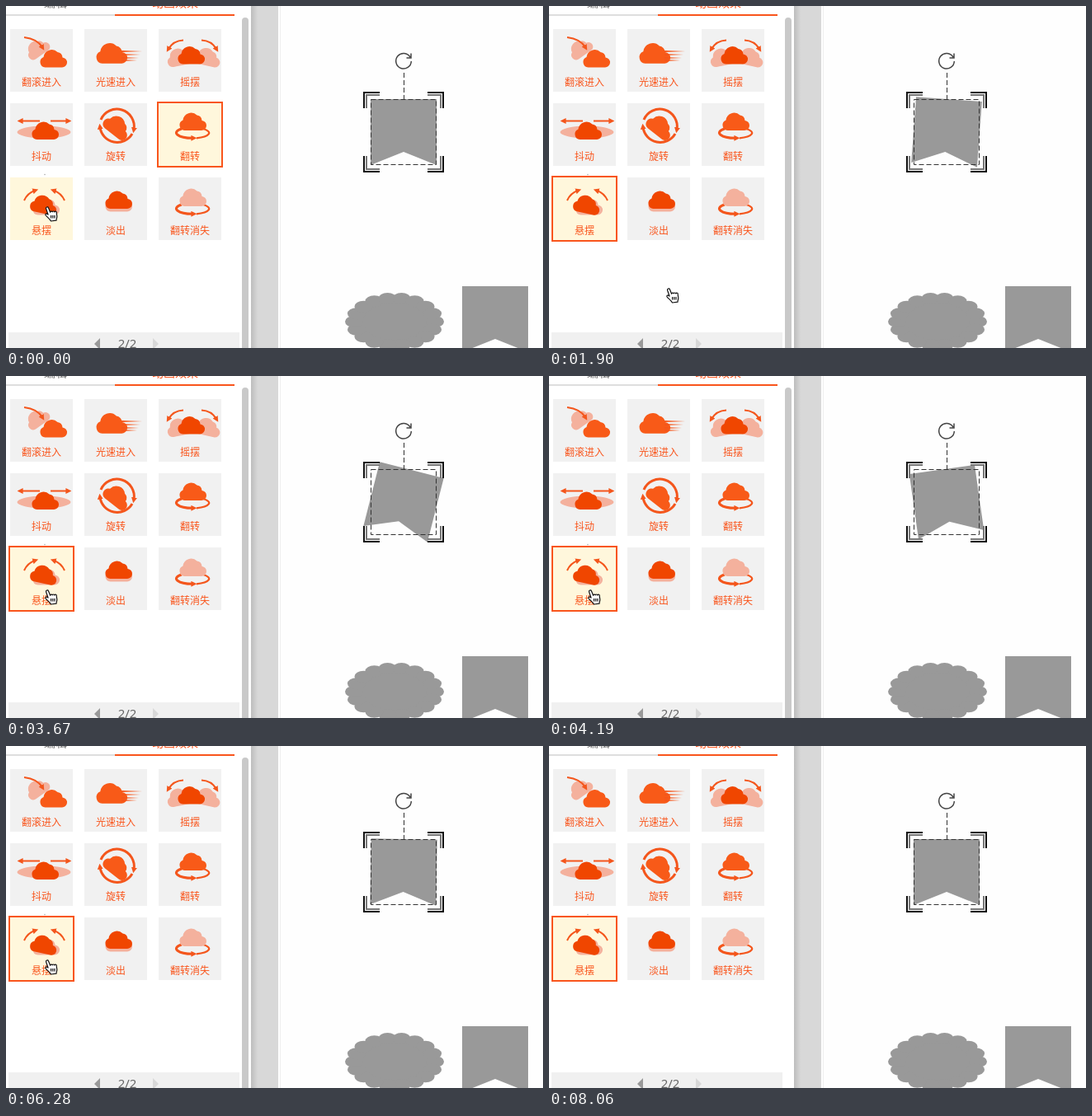
An HTML page that plays this animation: 651x415 px, repeating every 8.77 s.

```html
<!DOCTYPE html>
<html lang="zh-CN">
<head>
<meta charset="utf-8">
<style>
html, body { margin: 0; width: 100%; height: 100%; overflow: hidden; background: #fff; }
svg { display: block; }
text { font: 12px "Noto Sans CJK SC", "Noto Sans CJK", "Noto Sans", sans-serif; fill: #f9551c; text-anchor: middle; }
text.big { font-size: 14px; }
.gray { fill: #666; }
.dark { fill: #f04600; }
.mid { fill: #f85a18; }
.light { fill: #f4b19d; }
.arrow { fill: none; stroke: #f4561c; stroke-width: 2; marker-end: url(#head); }
.ring { fill: none; stroke: #f4561c; stroke-width: 2.2; }
.thick { stroke-width: 3; }
.shape { fill: #999; }
.dash { fill: none; stroke: #333; stroke-dasharray: 6 3; }
</style>
</head>
<body>
<svg width="651" height="415" viewBox="0 0 651 415">
  <defs>
    <path id="cloud" d="M7 23A6.5 6.5 0 0 1 5 10.5A10 10 0 0 1 22 4.5A7 7 0 0 1 28 11A6 6 0 0 1 27 23Z"/>
    <path id="banner" d="M-40-40H40V40L0 24L-40 40Z"/>
    <g id="bracket" fill="none" stroke-width="2">
      <path d="M1 20V1H20" stroke="#111"/>
      <path d="M4 20V4H20" stroke="#777"/>
    </g>
    <marker id="head" viewBox="0 0 8 8" refX="3" refY="4" markerWidth="7" markerHeight="7" markerUnits="userSpaceOnUse" orient="auto">
      <path d="M0 0L8 4L0 8Z" fill="#f4561c"/>
    </marker>
    <linearGradient id="shade">
      <stop offset="0" stop-color="#bdbdbd"/><stop offset=".25" stop-color="#d8d8d8"/>
    </linearGradient>
  </defs>

  <rect x="297" width="33" height="415" fill="url(#shade)"/>
  <rect x="330" width="321" height="415" fill="#fefefe"/>
  <rect x="332" width="1" height="415" fill="#eee"/>

  <text class="big gray" x="60" y="1">编辑</text>
  <text class="big" x="205" y="1">动画效果</text>
  <rect y="10" width="132" height="2" fill="#dedede"/>
  <rect x="132" y="10" width="145" height="2" fill="#f9551c"/>
  <rect id="bar" x="286" y="14" width="8" height="420" rx="4" fill="#c9c9c9"/>

  <g id="tiles"></g>
  <circle cx="47" cy="204.5" r=".8" fill="#aaa"/>

  <rect x="3" y="396" width="280" height="19" fill="#f0f0f0"/>
  <path d="M107 410L114 403V417Z" fill="#999"/>
  <path d="M185 410L178 403V417Z" fill="#d8d8d8"/>
  <text class="gray" x="147" y="415" style="font:15px 'Noto Sans',sans-serif">2/2</text>

  <g id="scallop" class="shape"><ellipse cx="471" cy="383" rx="54" ry="31"/></g>
  <use href="#banner" class="shape" x="593" y="380"/>
  <use href="#banner" class="shape" id="swing"/>

  <path class="dash" d="M482.5 81V113"/>
  <rect class="dash" x="442.5" y="113.5" width="79" height="79"/>
  <g id="corners"></g>
  <path d="M490 62A9.3 9.3 0 1 0 491.3 67M491 57.5V63H485.5" fill="none" stroke="#444" stroke-width="1.5"/>

  <path id="hand" fill="#fff" stroke="#111" stroke-width="1.2" stroke-linejoin="round"
    d="M4 10L1.6 3A1.5 1.5 0 0 1 4.5 2L6.6 7.3A1.4 1.4 0 0 1 9.2 6.8A1.4 1.4 0 0 1 11.8 7A1.3 1.3 0 0 1 14.2 8L14.8 12C14.9 14 14 15 14 17.2L7.5 18C6 15 2 12.5 1 10.7C.4 9.2 2.4 8.4 4 10ZM7.6 11V14.5M9.8 11V14.5M12 11V14.5"/>
</svg>
<script>
const $ = id => document.getElementById(id);
const cloud = (tone, x, y, scale = 1, turn = 0) =>
  `<use href="#cloud" class="${tone}" transform="translate(${x} ${y}) rotate(${turn}) scale(${scale}) translate(-16.5 -11.5)"/>`;
const arrow = (d, kind = '') => `<path class="arrow ${kind}" d="${d}"/>`;
const halo = y => `<path class="ring" d="M54 ${y - 5}A20 6.5 0 0 1 46 ${y + 6.3}"/>`
  + arrow(`M28 ${y - 5}A20 6.5 0 0 0 42 ${y + 6.3}`, 'thick');

// Icons use coordinates local to their 76 px tile.
const tiles = [
  ['翻滚进入', cloud('light', 32, 23, .9, -35) + cloud('mid', 52, 35) + arrow('M17 10Q33 12 39 22')],
  ['光速进入', cloud('mid', 32.5, 28.5, 1.15) + [27, 31, 35, 38].map((y, i) =>
    `<path d="M45 ${y - 1}L${70 - i * 2} ${y}L45 ${y + 1}Z" fill="#f4561c"/>`).join('')],
  ['摇摆', cloud('light', 25, 33, .98, -12) + cloud('light', 59, 33, .98, 12) + cloud('dark', 39, 31)
    + arrow('M30 13.5Q18 14 12 24') + arrow('M52 13.5Q64 14 70 24')],
  ['抖动', '<ellipse class="light" cx="41" cy="35" rx="32.5" ry="7.5"/>' + cloud('dark', 42, 32.5)
    + arrow('M36 21.5H13') + arrow('M49 21.5H70')],
  ['旋转', cloud('mid', 40, 27, 1.05, 38) + arrow('M20 20A21 21 0 0 1 60 32', 'thick') + arrow('M58 37A21 21 0 0 1 19 29', 'thick')],
  ['翻转', halo(36) + cloud('mid', 41, 21.5)],
  ['悬摆', cloud('light', 43, 34) + cloud('dark', 40.5, 32, 1, 12) + arrow('M17 28Q21 19 30 16') + arrow('M66 28Q62 19 53 16')],
  ['淡出', cloud('light', 41, 30) + cloud('dark', 41, 26.5)],
  ['翻转消失', halo(38) + cloud('light', 41, 23.5)],
];
$('tiles').innerHTML = tiles.map(([label, icon], i) =>
  `<g transform="translate(${5 + i % 3 * 90} ${28 + Math.floor(i / 3) * 90})">
  <rect class="tile" width="76" height="76"/>${icon}<text x="38" y="69">${label}</text></g>`).join('');
const rects = [...document.querySelectorAll('.tile')];

for (let i = 0; i < 18; i++) {
  const a = i / 18 * 2 * Math.PI;
  $('scallop').innerHTML += `<ellipse cx="${471 + 49 * Math.cos(a)}" cy="${383 + 28.5 * Math.sin(a)}" rx="11" ry="7"/>`;
}
$('corners').innerHTML = [[1, 1], [-1, 1], [1, -1], [-1, -1]].map(([x, y]) =>
  `<use href="#bracket" transform="translate(482 153) scale(${x} ${y}) translate(-49 -49)"/>`).join('');

const LOOP = 8770, SWING = 1870, CLICK = 560;
const starts = [745, 3398, 6250];
const angles = [0, 15, -10, 5, -5, 0];
// time, x, y of the pointer
const path = [[0, 47, 243], [720, 47, 243], [1000, 100, 300], [1350, 142, 342], [2100, 142, 342], [2350, 101, 327],
  [2590, 36, 286], [2770, 36, 286], [3000, 46, 259], [3120, 47, 259], [6450, 47, 259], [7050, 95, 420], [LOOP, 95, 420]];

// cubic-bezier(.25, .1, .25, 1)
function ease(x) {
  const curve = (s, a, b) => 3 * (1 - s) ** 2 * s * a + 3 * (1 - s) * s * s * b + s ** 3;
  let lo = 0, hi = 1;
  for (let i = 0; i < 20; i++) {
    const s = (lo + hi) / 2;
    if (curve(s, .25, .25) < x) lo = s; else hi = s;
  }
  return curve(lo, .1, 1);
}

function swingAngle(t) {
  const start = starts.find(s => t >= s && t < s + SWING);
  if (start === undefined) return 0;
  const p = (t - start) / SWING * 5, i = Math.floor(p);
  return angles[i] + (angles[i + 1] - angles[i]) * ease(p - i);
}

function pointer(t) {
  const i = path.findIndex(k => k[0] > t);
  const [t0, x0, y0] = path[i - 1], [t1, x1, y1] = path[i];
  const p = (t - t0) / (t1 - t0);
  return [x0 + (x1 - x0) * p, y0 + (y1 - y0) * p];
}

function draw(now) {
  const t = now % LOOP, chosen = t < CLICK ? 5 : 6;
  rects.forEach((r, i) => {
    const on = i === chosen, pad = on ? 1 : 0;
    r.setAttribute('x', -pad);
    r.setAttribute('y', -pad);
    r.setAttribute('width', 76 + 2 * pad);
    r.setAttribute('height', 76 + 2 * pad);
    r.setAttribute('fill', on || i === 6 ? '#fff7dc' : '#f1f1f1');
    r.setAttribute('stroke', on ? '#f9551c' : 'none');
    r.setAttribute('stroke-width', 2);
  });
  $('swing').setAttribute('transform', `translate(482 153) rotate(${swingAngle(t)})`);
  $('hand').setAttribute('transform', `translate(${pointer(t)})`);
  $('bar').setAttribute('opacity', Math.max(0, Math.min(1, (7200 - t) / 120)));
  requestAnimationFrame(() => draw(performance.now() - begin));
}
const begin = performance.now();
draw(0);
</script>
</body>
</html>
```
